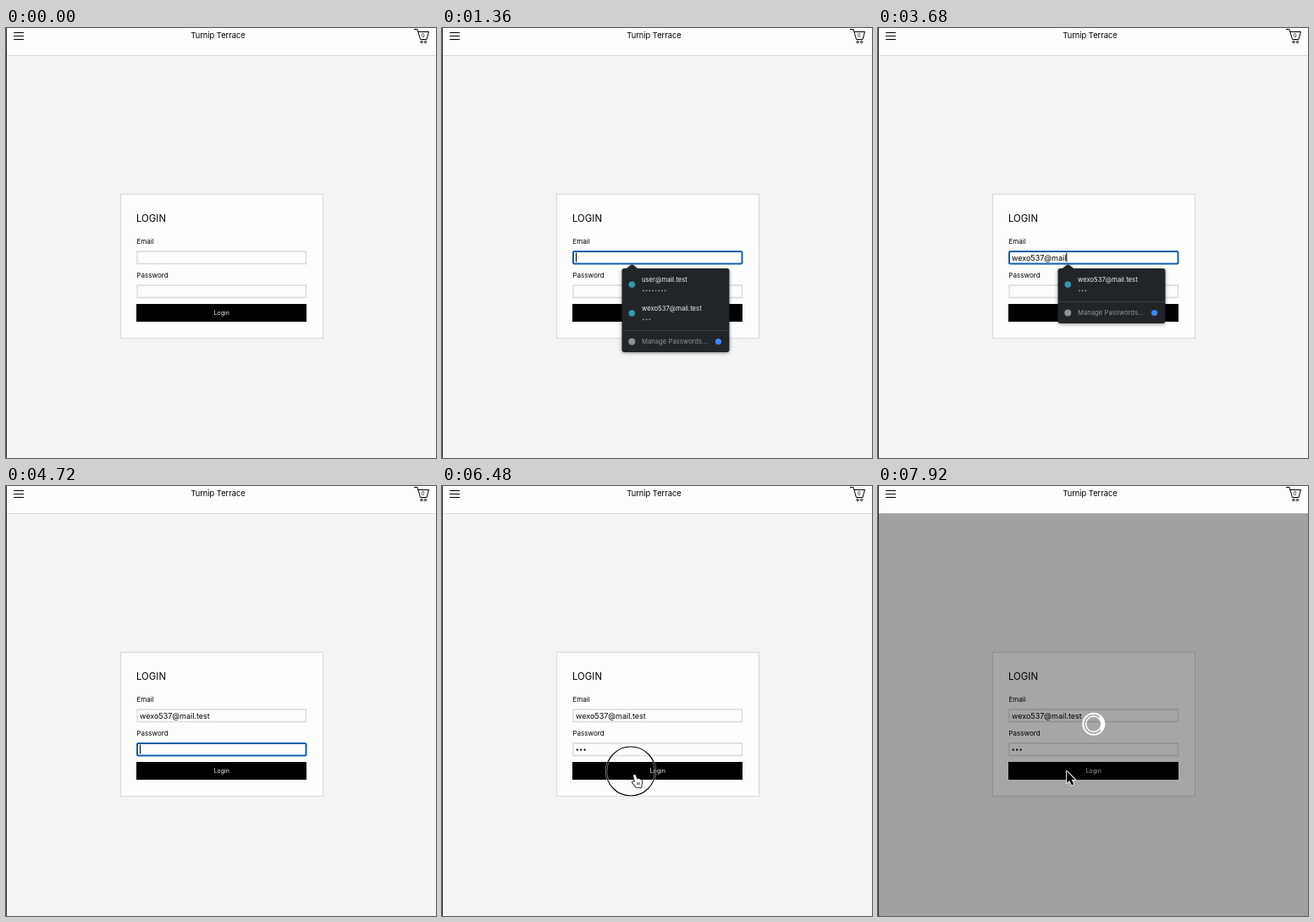
An HTML page with a canvas that plays this animation: 508 by 508 pixels, repeating every 8000 ms.

```html
<!DOCTYPE html>
<html lang="en">
<head>
<meta charset="utf-8">
<title>Login</title>
<style>
  html, body { margin: 0; width: 100%; height: 100%; overflow: hidden; background: #f4f4f4; }
  canvas { display: block; }
</style>
</head>
<body>
<canvas id="stage" width="508" height="508"></canvas>
<script>
const ctx = document.getElementById('stage').getContext('2d');
const LOOP = 8000, STEP = 80;
const EMAIL = 'wexo537@mail.test', OTHER_EMAIL = 'user@mail.test';

// Moment at which each character appears
const EMAIL_KEYS = [1440, 1520, 1520, 1600, 2160, 2320, 2480, 2880, 3360,
                    3520, 3600, 3680, 3920, 4160, 4320, 4400, 4560];
const PASSWORD_KEYS = [4960, 5120, 5360];
const FOCUS_EMAIL = 880, POPUP_IN = 960, FILTER = 1440, FOCUS_PASSWORD = 4720;
const CLICKS = [[800, 205, 271], [6480, 223, 337]];
const SUBMIT = 6560;
const MOVES = [
  { start: 160, end: 640, hide: 1280, from: [87, 294], to: [205, 271] },
  { start: 5760, end: 6240, hide: LOOP, from: [205, 271], to: [223, 337] },
];

const typed = (keys, t) => keys.filter(k => k <= t).length;
const clamp = v => Math.min(1, Math.max(0, v));
const ease = v => v * v * (3 - 2 * v);

function rect(x, y, w, h, color) {
  ctx.fillStyle = color;
  ctx.fillRect(x, y, w, h);
}

function text(str, x, y, size, color = '#000', align = 'left') {
  ctx.font = `${size}px Inter, Roboto, sans-serif`;
  ctx.textAlign = align;
  ctx.textBaseline = 'alphabetic';
  ctx.fillStyle = color;
  ctx.fillText(str, x, y);
  return ctx.measureText(str).width;
}

function dot(x, y, r, color) {
  ctx.fillStyle = color;
  ctx.beginPath();
  ctx.arc(x, y, r, 0, 7);
  ctx.fill();
}

function arc(x, y, r, width, color, from = 0, to = 2 * Math.PI) {
  ctx.strokeStyle = color;
  ctx.lineWidth = width;
  ctx.beginPath();
  ctx.arc(x, y, r, from, to);
  ctx.stroke();
}

function stroke(path, width, color = '#000') {
  ctx.strokeStyle = color;
  ctx.lineWidth = width;
  ctx.stroke(new Path2D(path));
}

function header() {
  rect(0, 0, 508, 32, '#fdfdfd');
  rect(0, 32, 508, 1, '#dcdcdc');
  stroke('M9 5.5H21M9 9.5H21M9 13.5H21', 1.2);
  text('Turnip Terrace', 250.5, 12, 9.3, '#000', 'center');
  stroke('M482 1.5H486L489.5 13.5H497L499.5 4.5H487', 1);
  arc(491, 16.5, 1.2, 1, '#000');
  arc(495.5, 16.5, 1.2, 1, '#000');
  text('0', 492.8, 11, 5.5, '#000', 'center');
}

function field(y, focused) {
  rect(154, y, 201, 16, '#fdfdfd');
  ctx.strokeStyle = focused ? '#145fa8' : '#dadada';
  ctx.lineWidth = focused ? 2 : 1.3;
  ctx.beginPath();
  ctx.roundRect(155, y + 1, 199.5, 14.5, focused ? 1.5 : 0);
  ctx.stroke();
}

function caret(x, y) {
  rect(x, y, 1, 11, '#000');
}

function form(t) {
  rect(135, 196, 240, 171, '#fdfdfd');
  ctx.strokeStyle = '#dcdcdc';
  ctx.lineWidth = 1.2;
  ctx.strokeRect(135.5, 196.5, 239, 170);
  text('LOGIN', 154, 228.5, 11.4);
  text('Email', 154.5, 255, 8);
  text('Password', 154.5, 295, 8);

  const onEmail = t >= FOCUS_EMAIL && t < FOCUS_PASSWORD;
  const onPassword = t >= FOCUS_PASSWORD && t < CLICKS[1][0];
  field(263, onEmail);
  field(303, onPassword);

  const width = text(EMAIL.slice(0, typed(EMAIL_KEYS, t)), 158, 274.5, 9);
  if (onEmail) caret(158 + width, 265.5);

  const dots = typed(PASSWORD_KEYS, t);
  for (let i = 0; i < dots; i++) dot(159.8 + i * 4.4, 311.7, 1.15, '#000');
  if (onPassword) caret(158 + dots * 4.4, 305.5);

  rect(154, 326, 201, 21, '#000');
  text('Login', 254.8, 339, 7, '#f4f4f4', 'center');
}

function account(y, name, dots) {
  dot(224.3, y, 3.8, '#3298ad');
  text(name, 236, y - 3, 7.7, '#eceef0');
  for (let i = 0; i < dots; i++) dot(238 + i * 3.65, y + 7.3, 0.9, '#a0a4a8');
}

function popup(t) {
  if (t < POPUP_IN || t >= FOCUS_PASSWORD) return;
  const filtered = t >= FILTER;
  const bottom = filtered ? 349 : 383;
  ctx.save();
  ctx.globalAlpha = clamp((t - POPUP_IN + STEP) / 240);
  const box = new Path2D('M217.5 284.5L223 280Q224.5 279 226 280L231.5 284.5Z');
  box.roundRect(212.5, 284, 127, bottom - 284, 3);
  ctx.save();
  ctx.shadowColor = 'rgba(0,0,0,.4)';
  ctx.shadowBlur = 4;
  ctx.shadowOffsetY = 1;
  ctx.fillStyle = '#222528';
  ctx.fill(box);
  ctx.restore();
  if (filtered) {
    account(303, EMAIL, 3);
  } else {
    account(303, OTHER_EMAIL, 8);
    account(337, EMAIL, 3);
  }
  rect(212.5, bottom - 26, 127, 1, '#3b3e42');
  dot(224.3, bottom - 12.5, 4, '#8c9094');
  text('Manage Passwords…', 236, bottom - 9.7, 7.7, '#8f9397');
  dot(326.5, bottom - 12.5, 3.6, '#4285f4');
  ctx.restore();
}

function spinner(t) {
  const x = 254.8, y = 281.3;
  const angle = Math.PI + (t - SUBMIT) / 1000 * 2 * Math.PI;
  arc(x, y, 12.5, 2, '#fff');
  arc(x, y, 9.2, 1.5, '#fff');
  arc(x, y, 10.8, 4.4, '#fff', angle, angle + Math.PI / 2);
}

const ARROW = new Path2D('M0 0V14L3.3 11L5.8 16.5L8.3 15.4L5.9 10H10Z');
const HAND = new Path2D('M3 5Q4.5 3 6 5L7.5 10L8 8.5L10 9L10.5 9.5L12 10L13 11Q14 14 12.5 16V19H6.5L2 13.5Q1.8 11.8 3.5 12L5 13Z');

function shape(path, fill, line, width) {
  ctx.lineJoin = 'round';
  ctx.strokeStyle = line;
  ctx.lineWidth = width;
  ctx.stroke(path);
  ctx.fillStyle = fill;
  ctx.fill(path);
}

function cursor(t) {
  const move = MOVES.find(m => t >= m.start && t < m.hide);
  if (!move) return;
  const p = ease(clamp((t - move.start) / (move.end - move.start)));
  const [x, y] = move.from.map((v, i) => v + (move.to[i] - v) * p);
  const inside = (top, bottom) => x > 154 && x < 355 && y > top && y < bottom;
  ctx.save();
  ctx.translate(x, y);
  if (t >= SUBMIT) {
    shape(ARROW, '#000', '#fff', 1.8);
  } else if (inside(326, 347)) {
    shape(HAND, '#fff', '#000', 1.6);
    stroke('M8 13V16M10 13V16', 0.8);
  } else if (inside(263, 279) || inside(303, 319)) {
    stroke('M-2.5 -6Q0 -6 0 -4Q0 -6 2.5 -6M0 -4V4M-2.5 6Q0 6 0 4Q0 6 2.5 6', 1);
  } else {
    shape(ARROW, '#000', '#fff', 1.8);
  }
  ctx.restore();
}

function clickRing(t) {
  for (const [time, x, y] of CLICKS) {
    if (t < time || t >= time + STEP) continue;
    arc(x, y, 29, 2.4, 'rgba(255,255,255,.6)');
    arc(x, y, 29, 1.1, '#000');
  }
}

function draw(now) {
  const t = Math.floor(now % LOOP / STEP) * STEP;
  rect(0, 0, 508, 508, '#f4f4f4');
  header();
  form(t);
  popup(t);
  if (t >= SUBMIT) {
    rect(0, 32.5, 508, 475.5, 'rgba(0,0,0,.345)');
    spinner(t);
  }
  rect(0, 0, 1, 508, '#333');
  clickRing(t);
  cursor(t);
  requestAnimationFrame(draw);
}
requestAnimationFrame(draw);
</script>
</body>
</html>
```
